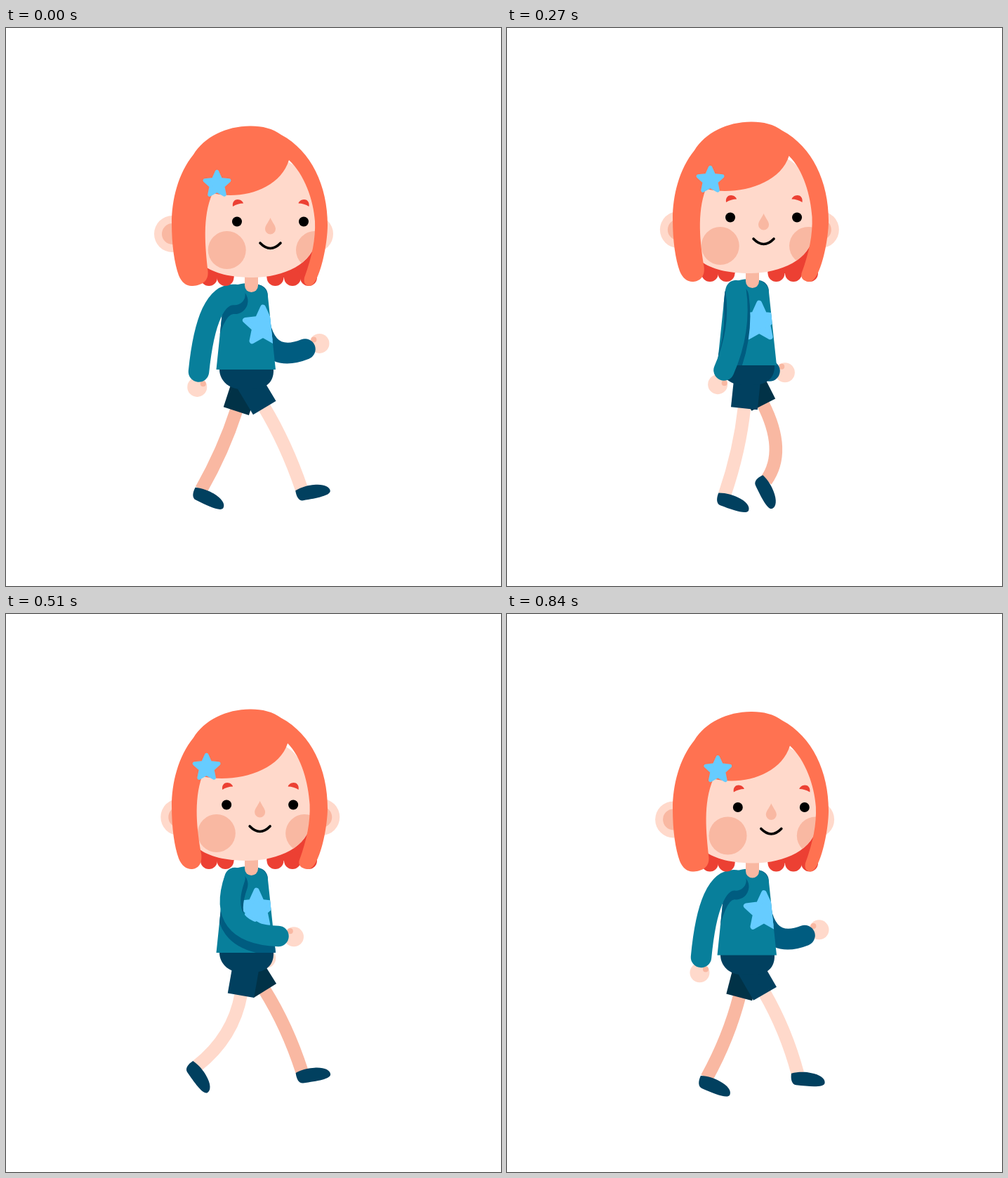
Animation, 705 px wide and 794 px high, one loop 870 ms. Source, as an HTML page with a canvas:

```html
<!DOCTYPE html>
<html lang="en">
<head>
<meta charset="utf-8">
<title>Walk cycle</title>
<style>
html, body { margin: 0; overflow: hidden; background: #fff; }
canvas { display: block; }
</style>
</head>
<body>
<canvas id="stage" width="705" height="794"></canvas>
<script>
const ctx = document.getElementById('stage').getContext('2d');
const LOOP = 870, STEP = 30;
const SKIN = '#ffd9cb', SHADE = '#f9b8a2', HAIR = '#ff7251', RED = '#ec4033',
  TEAL = '#087f9b', DEEP = '#005c80', NAVY = '#01405f', NIGHT = '#013247', SKY = '#66ccff';

// Each row starts with its time in ms.
const bobKeys = [[0, 0], [75, -4], [120, -6.5], [195, -10], [270, -6], [390, -1.2]];

// Leg rows: thigh angle, ankle x, ankle y, foot angle.
const nearLeg = [
  [0, 31, 421, 656, -8], [120, 22.6, 392, 661, -13], [270, -6, 310, 664, 22],
  [390, -20.4, 268.5, 660, 38], [510, -10, 272, 643, 57], [630, 20, 296, 622, 118],
  [735, 32, 372, 646, 62], [840, 30, 414, 654, 7.5]];
const farLeg = [
  [0, -18, 278, 657, 28], [120, 2, 295, 635, 80], [270, 27, 369, 644, 66],
  [390, 34, 428, 646, 0], [510, 32, 421.5, 651, -6], [630, 15, 377, 660, 10],
  [840, -14.5, 284.5, 660, 25]];

// Arm rows: bend x, bend y, cuff x, cuff y.
const nearArm = [
  [0, 286, 376, 274.5, 489], [120, 303, 411, 255.5, 472.5], [270, 334, 436, 309, 493],
  [390, 316, 459, 396, 454], [510, 298, 459, 388, 462.5], [630, 275, 432, 343, 487],
  [840, 287, 376, 276.5, 489]];
const farArm = [
  [0, 358, 484, 426, 457], [120, 367, 472, 411, 473.5], [270, 345, 491, 374, 494],
  [390, 310, 456, 325, 466], [510, 320, 480, 349, 488], [630, 345, 491, 378, 494],
  [840, 358, 484, 424, 458]];

const shoe = new Path2D('M-9 1C0-3 12-4 18-3.5C32-3 40 2 40 8C40 15 20 16 0 16.5C-6 16.5-9 10-9 1Z');
const hips = new Path2D('M304 480H381V488C381 502 372 514 350 514H335C316 514 304 500 304 486Z');
const sweater = new Path2D('M299.5 486L310 385C311 368 330 363 349 363C363 363 373 372 373 382L384 486Z');
const face = new Path2D('M270 190H400C440 205 446 270 441 300C439 335 395 355 352 355C320 355 296 349 282 338C262 320 262 240 270 190Z');
const nose = new Path2D('M376.5 270C379 276 384 281 384 286A7.5 7.5 0 0 1 369 286C369 281 374 276 376.5 270Z');
const brow = new Path2D('M323 254C322 247 326 244 330 244C334 244 337.5 247 338 249.5Q330 249.5 323 254Z');
const smile = new Path2D('M362 306Q376.5 321 391 306');

// Periodic cubic through the rows.
function sample(rows, time, period) {
  const n = rows.length, t = time % period;
  let i = n - 1;
  while (rows[i][0] > t) i--;
  const row = k => rows[(k + n) % n];
  const at = k => row(k)[0] + period * Math.floor(k / n);
  const h = at(i + 1) - at(i), u = (t - at(i)) / h;
  return row(i).slice(1).map((a, j) => {
    const v = k => row(k)[j + 1];
    const slope = k => (v(k + 1) - v(k - 1)) / (at(k + 1) - at(k - 1)) * h;
    const b = v(i + 1), m = slope(i), d = b - a;
    return a + u * (m + u * (3 * d - 2 * m - slope(i + 1) + u * (m + slope(i + 1) - 2 * d)));
  });
}

function fill(path, color) {
  ctx.fillStyle = color;
  ctx.fill(path);
}

function dot(x, y, r, color) {
  ctx.fillStyle = color;
  ctx.beginPath();
  ctx.arc(x, y, r, 0, 7);
  ctx.fill();
}

function tube(x0, y0, qx, qy, x1, y1, width, color, cap) {
  ctx.strokeStyle = color;
  ctx.lineWidth = width;
  ctx.lineCap = cap;
  ctx.beginPath();
  ctx.moveTo(x0, y0);
  ctx.quadraticCurveTo(qx, qy, x1, y1);
  ctx.stroke();
}

function placed(dx, dy, draw, turn = 0) {
  ctx.save();
  ctx.translate(dx, dy);
  ctx.rotate(turn);
  draw();
  ctx.restore();
}

function star(x, y, r) {
  ctx.fillStyle = ctx.strokeStyle = SKY;
  ctx.lineWidth = r * 0.26;
  ctx.lineJoin = 'round';
  ctx.beginPath();
  for (let k = 0; k < 10; k++) {
    const a = k * Math.PI / 5, d = r * (k % 2 ? 0.42 : 0.88);
    ctx.lineTo(x + d * Math.sin(a), y - d * Math.cos(a));
  }
  ctx.closePath();
  ctx.fill();
  ctx.stroke();
}

function leg(rows, time, bob, skin, cloth) {
  const [thigh, x, y, foot] = sample(rows, time, LOOP);
  const a = thigh * Math.PI / 180, s = Math.sin(a), c = Math.cos(a);
  const hx = 343, hy = 498.5 + bob, kx = hx + 49 * s, ky = hy + 49 * c;
  const bend = 60 + Math.max(0, 1.4 * (118 - Math.hypot(x - kx, y - ky)));
  tube(kx - 2 * s, ky - 2 * c, kx + bend * s, ky + bend * c, x, y, 18.5, skin, 'butt');
  placed(x, y, () => fill(shoe, NAVY), foot * Math.PI / 180);
  placed(hx, hy, () => {
    ctx.fillStyle = cloth;
    ctx.fillRect(-19, 0, 38, 49);
  }, -a);
}

function arm(x, y, [qx, qy, ex, ey], color) {
  const len = Math.hypot(ex - qx, ey - qy), ux = (ex - qx) / len, uy = (ey - qy) / len;
  const hx = ex + 22 * ux, hy = ey + 22 * uy;
  dot(hx, hy, 14, SKIN);
  dot(hx - 5.5 * ux + 8 * uy, hy - 5.5 * uy - 8 * ux, 4, SHADE);
  tube(x, y, qx, qy, ex, ey, 29.5, color, 'round');
}

function torso(pose, turn) {
  fill(hips, NAVY);
  fill(sweater, TEAL);
  ctx.save();
  ctx.clip(sweater);
  star(361 + 5 * turn, 424, 30);
  const [qx, qy, ex, ey] = pose;
  tube(326, 388.5, qx, qy + 9, ex, ey + 9, 37, DEEP, 'round');
  ctx.restore();
  tube(349.5, 340, 349.5, 350, 349.5, 366.5, 19, SHADE, 'round');
  arm(326, 379.5, pose, TEAL);
}

function features() {
  for (const x of [329, 424]) dot(x, 275.5, 7, '#000');
  fill(nose, SHADE);
  fill(brow, RED);
  ctx.save();
  ctx.translate(754.5, 0);
  ctx.scale(-1, 1);
  fill(brow, RED);
  ctx.restore();
  ctx.strokeStyle = '#000';
  ctx.lineWidth = 3.6;
  ctx.lineCap = 'round';
  ctx.stroke(smile);
}

function head(turn) {
  const d = turn - 1, look = 8 * d;
  for (const x of [242 - 5 * turn, 445 - 5 * turn]) {
    dot(x, 293, 26, SKIN);
    dot(x, 293, 15, SHADE);
  }
  ctx.fillStyle = RED;
  ctx.fillRect(270, 290, 54.5, 65);
  ctx.fillRect(371.5, 290, 71.5, 65);
  for (const x of [289, 312.5, 383.5, 408, 431]) dot(x, 355, 12, RED);

  placed(4 * d, 0, () => {
    fill(face, SKIN);
    ctx.clip(face);
    for (const x of [314.7, 440]) dot(x + 4 * d, 316, 27, SHADE);
  });
  placed(look, 0, features);

  const low = 5 * d, mid = 6.5 * d, right = 4 * d;
  fill(new Path2D(`M349 139.5C315 139 282 155 267 180C245 207 236 245 236 277
    C236 310 240 335 246 352C250 362 257 367 264 367
    C${276 + low / 2} 367 ${289 + low} 362 ${287.5 + low} 346
    C${284 + mid} 312 ${279 + mid} 270 ${294 + look} 235
    C${335 + mid} 245 ${390 + d} 230 ${403 + d} 188
    C${425 + right / 2} 208 ${438 + right} 245 ${440 + right} 275
    C${441 + right} 300 ${436 + right} 325 ${425 + right} 355
    C${423 + right} 364 ${428 + right / 2} 367 ${433 + d} 367
    C446 365 458 310 458 280C458 225 435 175 392 152C380 143 365 139.5 349 139.5Z`), HAIR);
  star(300.5 + look, 222.5, 20.5);
}

function draw(now) {
  const time = Math.floor(now % LOOP / STEP) * STEP;
  const turn = Math.cos(2 * Math.PI * time / LOOP);
  const [bob] = sample(bobKeys, time, LOOP / 2);
  ctx.fillStyle = '#fff';
  ctx.fillRect(0, 0, 705, 794);
  placed(0, bob, () => arm(358, 380, sample(farArm, time, LOOP), DEEP));
  leg(farLeg, time, bob, SHADE, NIGHT);
  leg(nearLeg, time, bob, SKIN, NAVY);
  placed(0, bob, () => {
    torso(sample(nearArm, time, LOOP), turn);
    head(turn);
  });
}

const start = performance.now();
function frame() {
  draw(performance.now() - start);
  requestAnimationFrame(frame);
}
frame();
</script>
</body>
</html>
```
